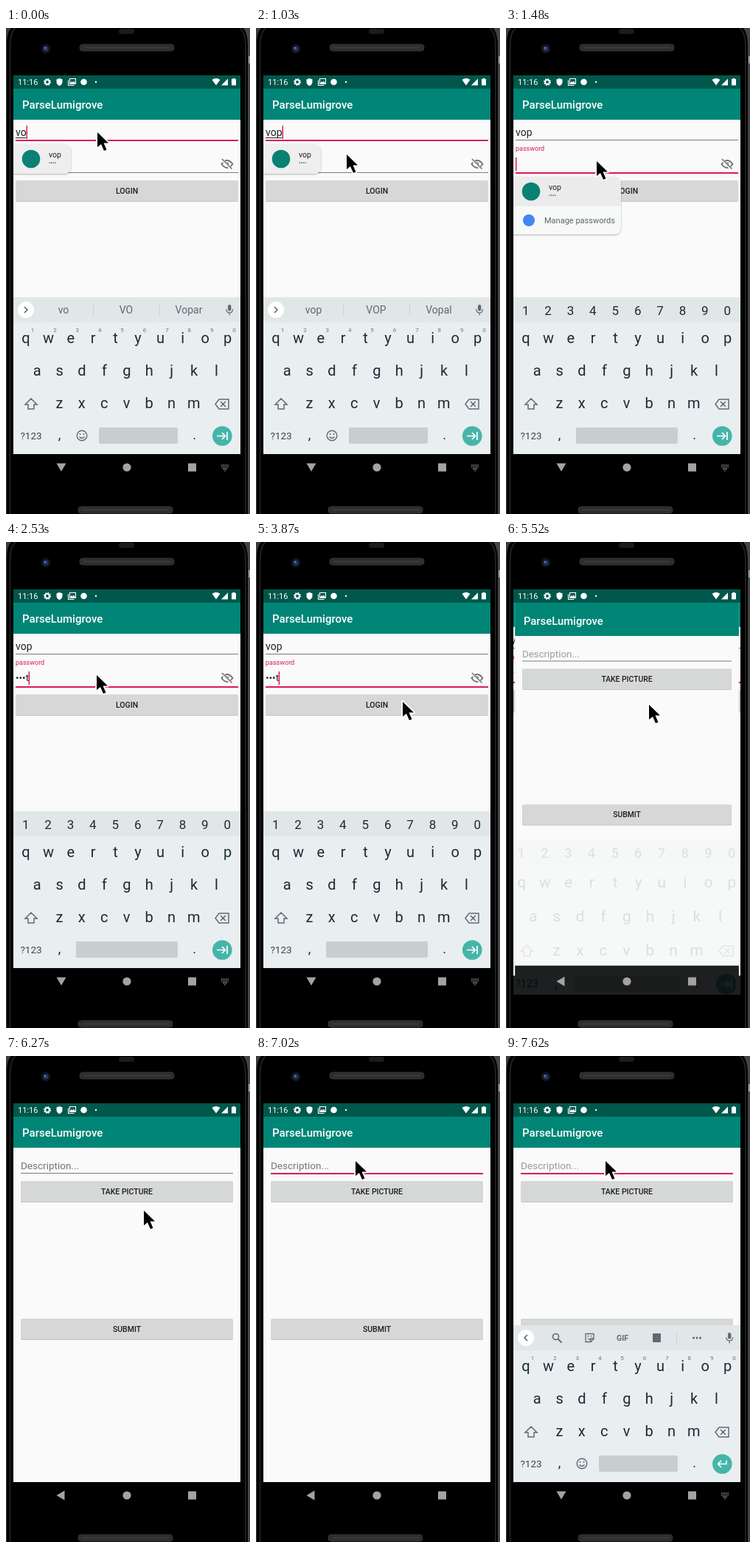
These frames come from a looping animation (331 px wide and 657 px high, 8 s). An HTML page:

```html
<!DOCTYPE html>
<html lang="en">
<head>
<meta charset="utf-8">
<title>Login demo</title>
<style>
html, body { margin: 0; width: 100%; height: 100%; overflow: hidden; background: #000; }
svg { display: block; width: 331px; height: 657px; font-family: Roboto, "Noto Sans", sans-serif; }
</style>
</head>
<body>
<svg id="stage" viewBox="0 0 331 657"></svg>
<script>
const LOOP = 8000, PINK = '#d81b60', KEY = '#1c2b33', ICON = '#5f6b72', PITCH = 30.4;
const USER = 'vop', PASS = 'test', TITLE = 'ParseLumigrove';

const rect = (x, y, w, h, fill, more = '') =>
  `<rect x="${x}" y="${y}" width="${w}" height="${h}" fill="${fill}" ${more}/>`;
const circle = (x, y, r, fill, more = '') =>
  `<circle cx="${x}" cy="${y}" r="${r}" fill="${fill}" ${more}/>`;
const path = (d, fill, more = '') => `<path d="${d}" fill="${fill}" ${more}/>`;
const line = (d, color, width = 1.4, more = '') =>
  path(d, 'none', `stroke="${color}" stroke-width="${width}" ${more}`);
const text = (x, y, s, size, fill, more = '') =>
  `<text x="${x}" y="${y}" font-size="${size}" fill="${fill}" ${more}>${s}</text>`;
const mid = (x, y, s, size, fill, more = '') => text(x, y, s, size, fill, 'text-anchor="middle" ' + more);
const group = (body, more) => `<g ${more}>${body}</g>`;
const clip = (body, id) => group(body, `clip-path="url(#${id})"`);
const zoom = (s, dy = 0) => `transform="translate(164 ${338 + dy}) scale(${s}) translate(-164 -338)"`;
const latest = (keys, t) => keys.filter(k => k[0] <= t).pop();

const defs = `<defs>
  <clipPath id="screen"><rect x="10" y="64" width="308" height="548"/></clipPath>
  <clipPath id="content"><rect x="10" y="64" width="308" height="512"/></clipPath>
  <clipPath id="login"><rect x="13" y="206" width="302" height="28" rx="2"/></clipPath>
  <filter id="shadow" x="-20%" y="-20%" width="140%" height="150%">
    <feDropShadow dx="0" dy="1" stdDeviation="1.3" flood-opacity=".3"/></filter>
</defs>`;

function phone() {
  return rect(0, 0, 331, 657, '#000') +
    path('M0 0H7Q1 6 1 22V657H0Z', '#3c3c3c') +
    line('M5.5 657V24Q5.5 6 13 0', '#1f1f1f', 2) +
    path('M331 0H322Q328 8 328 24V657H331Z', '#444') +
    line('M325 657V24Q325 6 317 0', '#1f1f1f', 2) +
    rect(329, 38, 2, 10, '#999') +
    rect(153, 1, 21, 7, '#1b1b1b', 'rx="3.5"') +
    circle(54, 28, 6.5, '#10131c') + circle(54, 28, 3.5, '#26345f') + circle(53, 27, 1.3, '#6279bd') +
    [[100, 22], [98, 647]].map(([x, y]) =>
      rect(x, y, 128, 9, '#2d2d2d', 'rx="4" stroke="#353535"') +
      line(`M${x + 5} ${y + 4.5}h118`, '#3c3c3c', 2)).join('');
}

function statusBar() {
  const w = '#fff';
  return rect(10, 64, 308, 18, '#00574b') + text(16, 77, '11:16', 11, w) +
    circle(56, 73, 2.9, 'none', 'stroke="#fff" stroke-width="2"') +
    circle(56, 73, 4.4, 'none', 'stroke="#fff" stroke-width="1.3" stroke-dasharray="1.7 1.75"') +
    path('M72.5 68l4 1.6v3.2q0 3.6-4 5.4q-4-1.8-4-5.4v-3.2z', w) +
    line('M86.5 68.5h8v7h-8zM84.5 70.5v7h8', w, 1.1) + path('M87 75l2-3l1.5 1.5l1.5-2l2 3.5z', w) +
    circle(105.5, 73, 4.3, w) + circle(122, 73, 1.2, w) +
    path('M279.5 70q5.5-4 11 0l-5.5 7.5z', w) + path('M301 68.5v9h-9z', w) +
    path('M306 69h1.5v-1h3v1h1.5v8.5h-6z', w);
}

const appBar = () => rect(10, 64, 308, 60, '#008577') +
  text(22, 109, TITLE, 15, '#fff', 'font-weight="500"');

const button = (x, y, w, label, ripple = '') =>
  rect(x, y + 1, w, 28, '#c6c6c6', 'rx="2"') + rect(x, y, w, 28, '#d6d7d7', 'rx="2"') + ripple +
  mid(164, y + 17.8, label, 10.5, '#1d1d1d', 'font-weight="500"');

const caret = (x, y) => rect(x, y, 1.5, 18, PINK);
const underline = (x, y, w, focus) => rect(x, y, w, focus ? 2 : 1, focus ? PINK : '#7b7b7b');
const account = y => circle(34, y, 12.3, '#0b8074') +
  text(58, y - 2, USER, 10.5, '#222') + text(58, y + 8, '••••', 7.5, '#444');

function eye() {
  return path('M292.5 184q7.5-10 15 0q-7.5 10-15 0z', 'none', 'stroke="#757575" stroke-width="2"') +
    circle(300, 184, 2.4, '#757575') + line('M293 178l13 13', '#fafafa', 3.5) +
    line('M293 177l13.5 13.5', '#757575', 1.6);
}

function ripple(t) {
  if (t < 4770) return '';
  const r = t < 4920 ? 106 : 310;
  return group(rect(13, 206, 302, 28, '#cdcdcd') + rect(188 - r, 200, 2 * r, 40, '#c2c2c2'),
    `clip-path="url(#login)" opacity="${t < 5070 ? 1 : .5}"`);
}

function loginScreen(t) {
  const onPass = t >= 1040, name = t < 140 ? USER.slice(0, 2) : USER;
  const typed = t < 2080 ? 0 : Math.min(4, 1 + Math.floor((t - 2080) / 150));
  const shown = typed && t < 4020 ? '•'.repeat(typed - 1) + PASS[typed - 1] : '•'.repeat(typed);
  const caretOn = !(t >= 2980 && t < 3570) && !(t >= 4020 && t < 4470) && t < 5070;
  const end = t < 140 ? 27.5 : 35.5;
  let s = rect(10, 64, 308, 512, '#fafafa') + appBar() +
    text(13, 146, name, 14, '#222') + underline(13, 151, 302, !onPass) +
    (onPass ? text(13, 166, 'password', 9, PINK) : text(13, 188, 'password', 13.5, '#808080')) +
    underline(13, 195, 302, onPass) + eye() +
    text(13, 188, shown, 13.5, '#222') + button(13, 206, 302, 'LOGIN', ripple(t));
  if (!onPass) {
    s += rect(13, 148, end - 13.5, 1, '#222') + caret(end, 132) +
      path('M8 157H78Q88 157 88 167V187Q88 197 78 197H8Z', '#eee', 'filter="url(#shadow)"') +
      account(177);
  } else if (caretOn) s += caret(13 + typed * 4.4, 175);
  if (t >= 1340 && t < 2080)
    s += group(path('M8 201H146Q156 201 156 211V269Q156 279 146 279H8Z', '#f7f8f8', 'filter="url(#shadow)"') +
      path('M8 201H146Q156 201 156 211V241H8Z', '#ebebeb') + account(221) +
      circle(31, 260, 8, '#4285f4') + text(52, 264, 'Manage passwords', 11, '#5f6368'),
      `opacity="${t < 1480 ? .5 : 1}"`);
  return s;
}

function postScreen(t) {
  const focus = t >= 6870;
  const hint = t < 5670 || t >= 7170 ? '#9b9b9b' : '#757575';
  return rect(10, 64, 308, 512, '#fafafa') + appBar() +
    text(20, 153, 'Description...', 13.5, hint) + underline(20, 158, 288, focus) +
    (t >= 7170 && t < 7620 ? caret(20, 139) : '') +
    button(20, 169, 288, 'TAKE PICTURE') + button(20, 355, 288, 'SUBMIT');
}

function suggestions(t) {
  const typed = USER.slice(0, t < 140 ? 2 : 3);
  const words = [typed, typed.toUpperCase(), t < 140 ? 'Vopar' : 'Vopal'];
  return line('M25 377l4 4l-4 4', '#555') +
    words.map((w, i) => mid(78 + 85 * i, 386, w, 14, '#5f6a70')).join('') +
    line('M118.5 373v16M208.5 373v16', '#ccd2d5', 1);
}

function toolbar() {
  return line('M29 377l-4 4l4 4', '#555') +
    circle(67.5, 379.5, 4, 'none', `stroke="${ICON}" stroke-width="1.6"`) +
    line('M70.5 382.5l5 5', ICON, 1.8) +
    line('M108 375.5h11v7l-4 4h-7zM115 386v-4h4M111 381.5q2 3 4 1', ICON, 1.3) +
    circle(111.5, 378.7, .9, ICON) + circle(115.5, 378.7, .9, ICON) +
    mid(158, 385, 'GIF', 10.5, ICON, 'font-weight="700"') +
    rect(199, 375, 11, 12, ICON, 'rx="1"') + line('M231.5 373v16', '#ccd2d5', 1) +
    [254.5, 259, 263.5].map(x => circle(x, 381, 1.5, ICON)).join('');
}

function keyboard(t) {
  const digits = t >= 1190 && t < 7000;
  const row = (keys, x, y, size, color = KEY) =>
    [...keys].map((k, i) => mid(x + PITCH * i, y, k, size, color)).join('');
  let s = rect(10, 364, 308, 212, '#e9eef1') + rect(10, 364, 308, 34, '#e1e6e9');
  if (digits) s += row('1234567890', 26.7, 388, 17);
  else {
    s += circle(27, 381, 11, '#fff') + (t < 2000 ? suggestions(t) : toolbar()) +
      rect(301, 374, 4.4, 8.5, ICON, 'rx="2.2"') +
      line('M298.8 380q0 5 4.4 5t4.4-5M303.2 385v3.5', ICON, 1.2) +
      row('1234567890', 36, 411, 8, '#69757b') +
      circle(103, 551, 6.8, 'none', `stroke="${ICON}" stroke-width="1.4"`) +
      circle(100.5, 549, 1, ICON) + circle(105.5, 549, 1, ICON) + line('M99.5 552.5q3.5 4 7 0', ICON, 1.3);
  }
  s += row('qwertyuiop', 27, 426, 20) + row('asdfghjkl', 42.2, 470, 20) + row('zxcvbnm', 72.4, 514, 20) +
    line('M34 501l-8 8h4v6h8v-6h4z', ICON, 1.5) +
    line('M289 502h13v13h-13l-5-6.5zM291 505l7 7M298 505l-7 7', ICON, 1.5) +
    mid(34, 556, '?123', 13.5, '#3b474d') + mid(72.4, 556, ',', 18, KEY) + mid(255.5, 556, '.', 18, KEY) +
    rect(digits ? 95 : 126, 540, digits ? 138 : 107, 22, '#c8cdd0', 'rx="2"') +
    circle(293.3, 551.5, 13.3, '#46b5a9') +
    line(t > 7000 ? 'M299 547v4.5h-11M292 547l-4.5 4.5l4.5 4.5'
      : 'M286 551.5h11M293 547l4.5 4.5l-4.5 4.5M300 546v11', '#fff', 1.7);
  return s;
}

function navButtons(t) {
  const c = '#a3a3a3', down = t < 5370 || t >= 7170;
  let s = path(down ? 'M68.5 588.5h13l-6.5 11z' : 'M79.5 587.5v13l-11-6.5z', c) +
    circle(164, 594, 5.6, c) + rect(247, 588.5, 11, 11, c);
  if (down) s += line('M292 591h10M292 593.5h10', '#8b8b8b', 1.3, 'stroke-dasharray="1.3 .85"') +
    line('M294 596h6', '#8b8b8b', 1.3) + path('M295.5 598h3l-1.5 1.5z', '#8b8b8b');
  return s;
}

// Pointer positions: [start, x, y]
const track = [[0, 123, 140], [740, 123, 153], [890, 122, 170], [1040, 122, 179],
  [2980, 122, 200], [3130, 120, 245], [3280, 120, 279], [3570, 158, 255], [3720, 190, 225],
  [3870, 198, 215], [4020, 195, 217], [4170, 193, 219],
  [6270, 186, 208], [6420, 165, 190], [6570, 145, 160], [6720, 134, 141]];

// Screen change: [start, new scale, new opacity, old scale, keyboard drop, keyboard opacity]
const opening = [[5370, .95, .6, 1.02, 12, .5], [5520, .986, 1, 1.043, 37, .13], [5670, .997, 1, 1.05, 46, .05]];

function screen(t) {
  const bar = rect(10, 576, 308, 36, '#000');
  if (t < 5370) return clip(loginScreen(t) + keyboard(t), 'content') + bar + navButtons(t);
  if (t < 5820) {
    const [, size, alpha, grow, drop, fade] = latest(opening, t);
    return clip(group(loginScreen(t), zoom(grow)) +
      group(postScreen(t) + bar, `${zoom(size)} opacity="${alpha}"`) +
      group(group(keyboard(t), zoom(grow, drop)), `opacity="${fade}"`), 'screen') + navButtons(t);
  }
  let s = postScreen(t);
  if (t >= 7170) s += group(keyboard(t), `transform="translate(0 ${t < 7320 ? 60 : 0})"`);
  return clip(s, 'content') + bar + navButtons(t);
}

function scene(t) {
  const [, x, y] = latest(track, t);
  return defs + phone() + screen(t) + statusBar() +
    path('M1 1V21L6 17L10 26L13.5 24.5L9.5 15.5H16Z', '#000',
      `transform="translate(${x} ${y})" stroke="#fff" stroke-width="3.6" stroke-linejoin="round" paint-order="stroke"`);
}

const stage = document.getElementById('stage');
let last = '';
function draw() {
  const next = scene(performance.now() % LOOP);
  if (next !== last) stage.innerHTML = last = next;
  requestAnimationFrame(draw);
}
draw();
</script>
</body>
</html>
```
